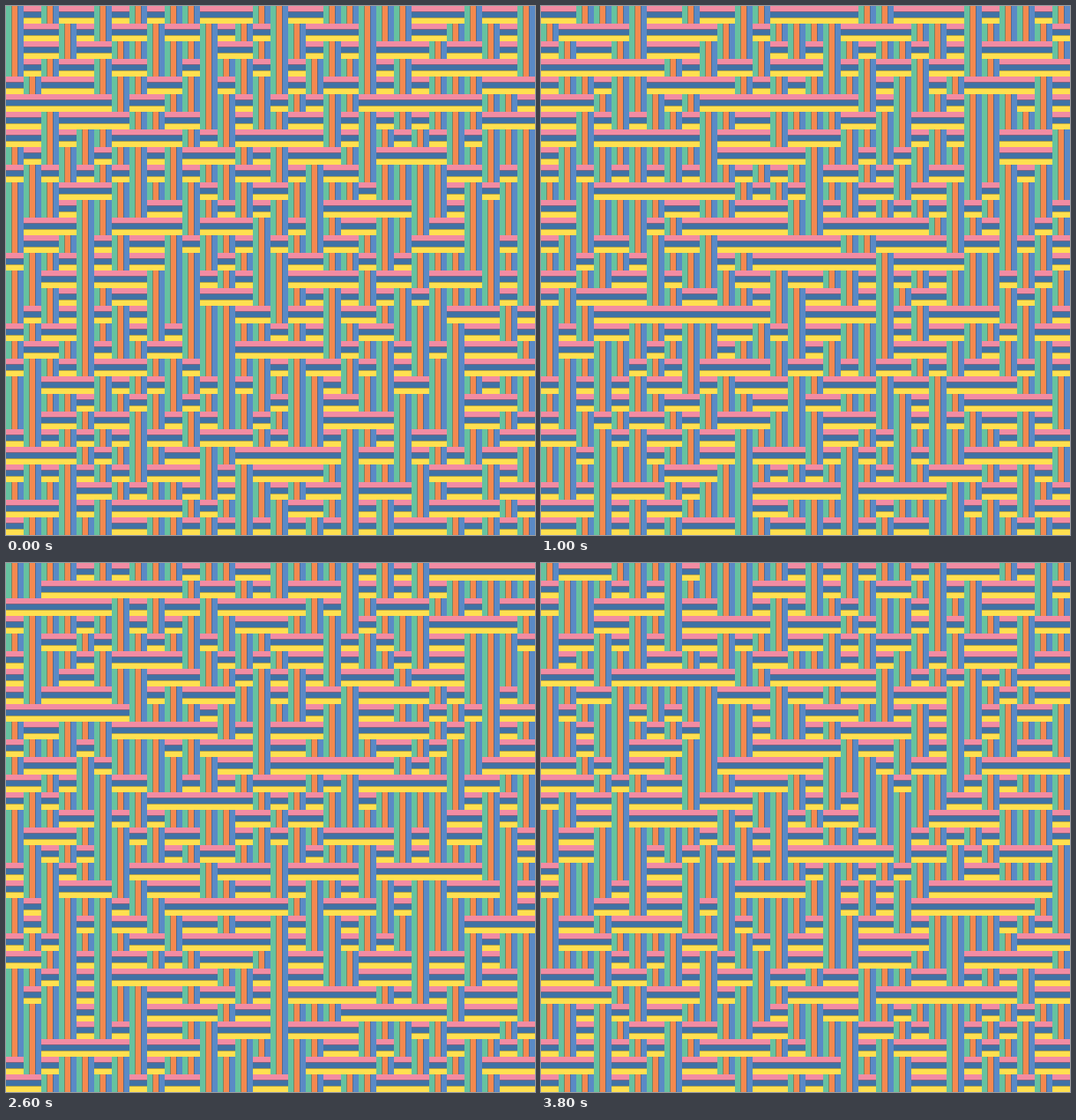
An HTML page with a canvas for the animation above (4000 ms loop, 600x600 px).

```html
<!DOCTYPE html>
<html lang="en">
<head>
<meta charset="utf-8">
<title>Woven stripes</title>
<style>
  html, body { margin: 0; width: 100%; height: 100%; overflow: hidden; }
  canvas { display: block; width: 600px; height: 600px; }
</style>
</head>
<body>
<canvas width="600" height="600"></canvas>
<script>
const ctx = document.querySelector('canvas').getContext('2d');
const SIZE = 600, CELL = 20, STRIPE = CELL / 3, STEP = 200, STEPS = 20;
const ACROSS = ['#f28ca3', '#4072a5', '#ffe050'];
const DOWN = ['#66c2a0', '#f4894f', '#5a8ac6'];

// Seeded generator (mulberry32): the same weave for the same step
function seeded(seed) {
  return () => {
    seed = (seed + 0x6d2b79f5) | 0;
    let t = Math.imul(seed ^ (seed >>> 15), seed | 1);
    t ^= t + Math.imul(t ^ (t >>> 7), t | 61);
    return ((t ^ (t >>> 14)) >>> 0) / 2 ** 32;
  };
}

function drawTile(x, y, across) {
  (across ? ACROSS : DOWN).forEach((color, i) => {
    const d = i * STRIPE;
    ctx.fillStyle = color;
    if (across) ctx.fillRect(x, y + d, CELL, STRIPE);
    else ctx.fillRect(x + d, y, STRIPE, CELL);
  });
}

function drawWeave(step) {
  const random = seeded(step * 7919 + 17);
  // The dark ground shows faintly through the antialiased stripe edges
  ctx.fillStyle = '#000';
  ctx.fillRect(0, 0, SIZE, SIZE);
  for (let y = 0; y < SIZE; y += CELL) {
    for (let x = 0; x < SIZE; x += CELL) {
      drawTile(x, y, random() < 0.5);
    }
  }
}

let shown = -1;
function tick() {
  const step = Math.floor(performance.now() / STEP) % STEPS;
  if (step !== shown) drawWeave(shown = step);
  requestAnimationFrame(tick);
}
tick();
</script>
</body>
</html>
```
